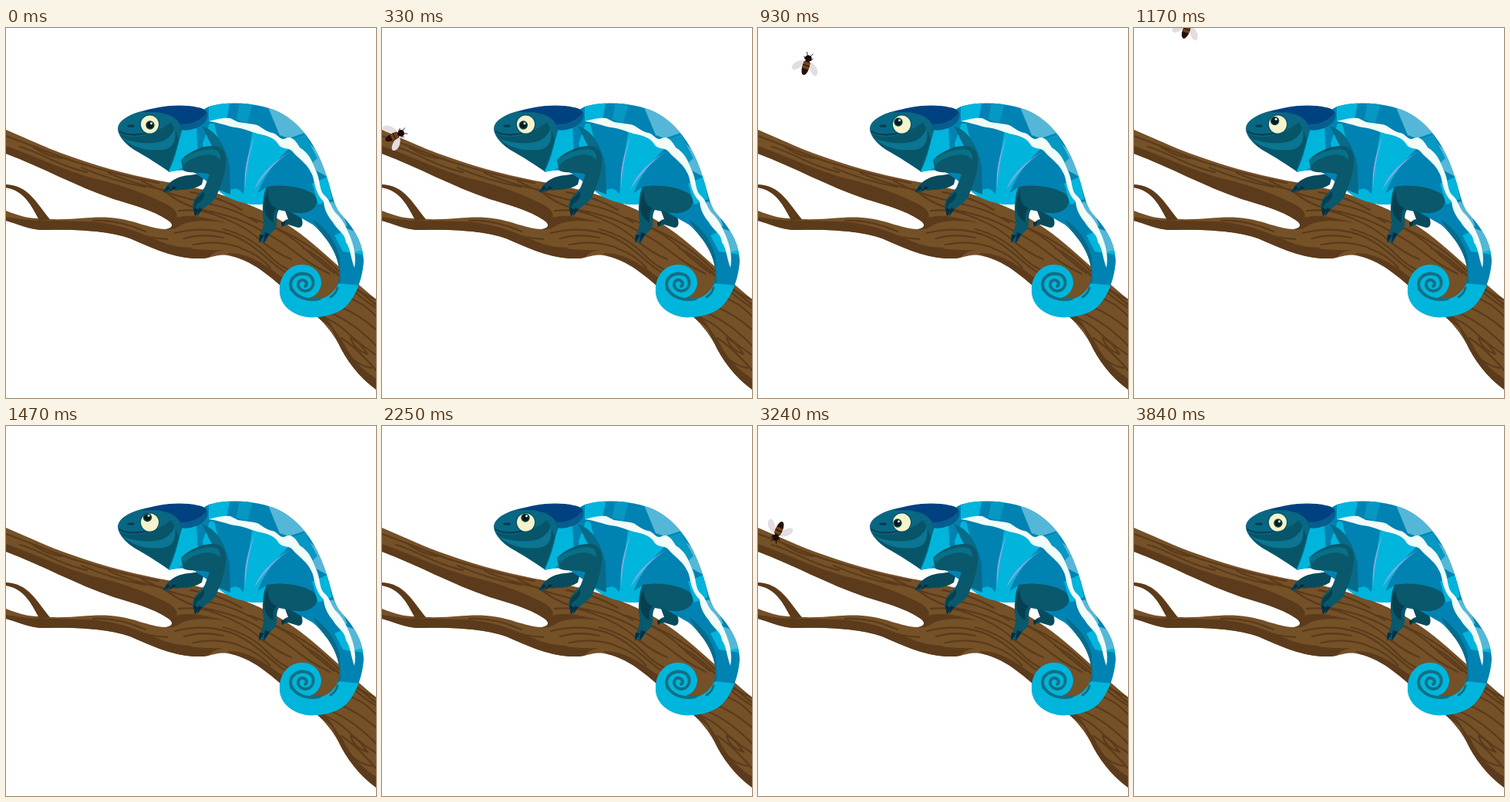
These frames come from a looping animation (480x480 px, 4230 ms). An HTML page:

```html
<!DOCTYPE html>
<html lang="en">
<head>
<meta charset="utf-8">
<title>Chameleon watching a fly</title>
<style>
html, body { margin: 0; width: 100%; height: 100%; overflow: hidden; background: #fff; }
svg { display: block; width: 100vw; height: 100vh; }
.line { fill: none; stroke-linecap: round; stroke-linejoin: round; }
</style>
</head>
<body>
<svg viewBox="0 0 480 480">
<defs>
  <path id="wood" d="M0 132C35 147 58 158 85 167C130 183 170 193 215 201C270 211 315 226 350 246C394 270 434 314 480 352V469C456 451 442 431 431 409C416 382 397 368 372 348C350 329 323 302 292 296C272 291 270 300 245 299C211 297 185 283 161 273C131 262 82 261 50 262C30 262 15 254 0 250V237C15 243 28 247 42 247C33 231 24 211 0 207V203C30 204 40 228 57 248C95 249 110 244 135 246C165 248 184 260 207 261C216 260 218 255 211 250C189 235 162 229 140 222C90 205 48 181 0 163Z"/>
  <path id="body" d="M211 187C214 165 220 147 226 130C238 116 252 108 263 102C290 94 328 97 354 109C386 125 404 158 413 184C423 211 424 229 434 241C451 259 463 278 464 302C463 324 454 349 440 362C426 373 409 376 391 375C367 371 354 356 355 338C356 319 369 307 384 307C399 307 409 318 409 331C408 344 398 351 386 351C402 357 424 350 431 331C438 305 421 275 398 255L345 225C333 230 320 230 306 226C295 224 279 216 272 207L245 188C234 183 222 184 211 187Z"/>
  <clipPath id="inWood"><use href="#wood"/></clipPath>
  <clipPath id="inBody"><use href="#body"/></clipPath>
  <clipPath id="inEye"><circle cx="186.500" cy="125" r="11.500"/></clipPath>
</defs>

<use href="#wood" fill="#755128"/>
<g clip-path="url(#inWood)">
  <g fill="#5b3b1b">
    <path d="M0 153C45 169 82 188 122 197C157 206 184 216 211 230C225 239 225 249 214 253L195 247L110 220L0 170Z"/>
    <path d="M0 245C33 252 69 249 103 251C147 252 179 268 208 280C230 286 258 289 282 288C256 294 270 302 246 302C190 297 165 272 115 264L40 266L0 254Z"/>
    <path d="M0 203C25 204 39 225 57 249L43 250C32 228 22 211 0 208Z"/>
    <path d="M286 292C317 291 339 310 365 328C403 350 419 382 437 407C449 431 464 445 482 456V472L447 444L422 389L380 357L330 315Z"/>
    <path d="M213 248C236 239 263 247 288 253C262 249 239 249 225 257C219 261 211 263 204 260Z"/>
  </g>
  <g class="line" stroke="#5b3b1b" stroke-width="2.300">
    <path d="M0 140C31 151 57 163 91 174C133 187 160 194 198 201"/>
    <path d="M18 154C48 163 71 180 105 187M35 154Q52 166 72 169M98 181Q139 199 181 206M133 188Q164 202 204 210"/>
    <path d="M176 198C205 215 237 222 268 229C291 234 306 241 326 252M205 211Q231 233 270 239M240 213Q277 219 306 236"/>
    <path d="M224 237C265 233 305 247 333 264C368 280 381 301 420 319M252 237Q304 250 333 278Q351 292 370 300"/>
    <path d="M219 266C252 258 285 261 310 277C335 291 352 316 382 327M231 273Q254 266 282 272M243 281Q276 274 304 285"/>
    <path d="M282 261Q317 270 339 293Q356 311 377 318M305 286Q327 293 343 311M317 246Q365 262 396 294L426 318"/>
    <path d="M352 260Q395 280 425 309Q449 334 480 359M385 285Q414 300 443 333Q460 351 480 363"/>
    <path d="M398 371Q425 377 446 398Q461 412 480 424M409 366Q443 374 480 412M432 361Q455 370 480 391M441 349Q464 356 480 374M448 336Q465 346 480 352"/>
    <path d="M435 402Q455 415 480 444M447 402Q451 417 469 423Q459 407 447 402M444 424Q459 439 474 441"/>
    <path d="M65 255C105 253 134 256 164 265M113 250Q145 248 181 264M151 264Q184 272 209 274M173 269Q204 286 239 286M10 247Q28 254 53 256"/>
  </g>
</g>

<!-- far limbs -->
<path fill="#084b5d" d="M204 213C208 202 220 192 238 191L258 188L254 203C243 211 229 209 220 211L216 209L207 214ZM362 237L366 248C360 249 357 254 358 258L366 255L379 259C385 259 386 253 383 245L377 236Z"/>

<use href="#body" fill="#0083b2"/>
<g clip-path="url(#inBody)">
  <g fill="#00b5dc">
    <path d="M229 130L247 128L249 163L218 190H205Z"/>
    <path d="M263 95L291 94L286 119L263 121ZM264 124L270 124L286 188L291 226L270 207L255 150Z"/>
    <path d="M320 131L345 141L357 153L369 154C351 172 329 195 322 230H307C309 197 315 162 320 131Z"/>
    <path d="M290 211Q300 204 307 215Q316 205 322 217L339 206V235H280Z"/>
    <path d="M397 202L417 193L423 222L405 229ZM426 269L444 261L465 278L464 294L437 290Z"/>
    <path d="M429 331L459 334L446 390H340V295H415V347Z"/>
  </g>
  <g fill="#55b7d7">
    <path d="M338 98L359 105Q382 121 388 136L367 143L355 139Z"/>
    <path d="M393 149L405 161L417 193L402 185L386 160ZM424 225L437 241L443 258L427 248L414 229Z"/>
    <path d="M442 260L456 265L466 287L451 291Z"/>
  </g>
  <path fill="#0698c2" d="M304 90L322 92L313 123L299 119ZM366 146L388 138L404 169L395 177Z"/>
  <path fill="#81a9df" d="M325 136Q313 165 310 209Q307 174 325 136ZM370 160Q343 177 322 210Q332 182 370 160Z"/>
  <path fill="#086b8b" d="M254 127Q281 136 290 178L291 216L269 207L272 163ZM398 248Q424 265 433 297L434 329L429 335L418 280Z"/>
  <path fill="#f1fbf7" d="M263 121C273 119 280 116 291 117L301 122L322 125C330 126 335 134 345 136C353 137 355 147 363 143C371 139 377 148 381 155C394 163 397 173 402 185C408 197 406 209 412 216C420 222 421 231 427 239C437 248 441 258 445 267C451 281 455 296 452 311C447 298 447 286 441 278C440 266 430 263 424 252C416 242 413 235 412 225C399 212 401 196 396 188C391 177 382 171 374 163C367 153 361 159 354 152C348 141 336 139 326 137C316 134 308 130 297 129C286 127 278 123 263 121Z"/>
</g>
<path class="line" stroke="#126f83" stroke-width="4" d="M407 351C391 355 375 349 370 337C366 325 378 317 388 319C400 320 402 335 393 340C384 344 376 336 380 329C385 323 394 331 388 335"/>
<path class="line" stroke="#126f83" stroke-width="3" d="M370 340C367 326 373 321 381 319M430 337Q428 345 421 349"/>

<!-- head -->
<path fill="#096783" d="M145 130C146 121 156 115 166 111C179 106 205 101 225 107L231 126C224 141 223 163 211 186C196 176 184 168 170 160C157 153 145 141 145 130Z"/>
<path fill="#075569" d="M148 137Q162 144 181 139Q203 132 214 122Q220 132 224 143C220 163 213 174 211 186C196 175 184 168 170 160Q154 151 148 137Z"/>
<path fill="#0b7592" d="M151 143Q169 151 193 149C207 148 216 139 219 130C222 151 213 160 195 158Q171 160 151 143Z"/>
<path fill="#00427f" d="M175 109C198 101 226 98 249 103C256 104 260 107 261 111C261 123 243 131 229 132C226 121 217 113 204 111C195 108 187 110 175 109Z"/>
<path fill="#075e8e" d="M261 109Q264 123 246 130Q236 134 227 132L225 125Q248 126 261 109Z"/>
<path class="line" stroke="#063d50" stroke-width="1.800" d="M147 134Q157 140 172 138Q186 137 196 133"/>
<ellipse cx="162" cy="127" rx="5" ry="1.800" fill="#063f50"/>
<circle cx="186.500" cy="125" r="13" fill="#075569"/>
<circle cx="186.500" cy="125" r="11.500" fill="#f4f3cc"/>
<g clip-path="url(#inEye)">
  <g id="pupil">
    <circle r="5.700" fill="#0b4545"/>
    <circle r="4.200" fill="#041b20"/>
    <circle cx="1.500" cy="-2.300" r="1.500" fill="#f4f3cc"/>
  </g>
</g>

<!-- near limbs -->
<path fill="#09586c" d="M227 171C238 160 254 153 268 153C283 152 287 165 285 178C283 194 277 209 273 218C269 227 259 231 253 237L248 244L243 238L242 230C243 220 254 213 258 206L264 190C254 186 238 189 230 185ZM338 206C360 202 382 206 397 214C406 221 405 232 395 237C381 244 367 238 354 236C349 243 353 254 350 260L342 268L336 278H328C328 269 336 258 334 249C332 235 333 216 338 206Z"/>
<path fill="#087087" d="M227 171Q246 158 267 157Q279 158 278 171Q269 161 251 166Q236 170 231 178Z"/>
<path fill="#06404f" d="M340 209Q338 228 351 234Q345 238 347 252Q333 245 335 224ZM257 212Q259 222 248 228L243 238L245 223Z"/>
<path fill="#052e40" d="M204 213L210 205L213 208ZM211 213L217 205L222 207ZM243 232L245 245L250 236ZM250 233L248 244L255 235ZM329 268L328 279L335 269ZM336 265L334 279L342 267ZM357 252L358 258L363 252Z"/>

<g id="fly">
  <g fill="#e5dce0">
    <path id="wing" d="M2 -4C9 -5 19 3 17 10C14 15 5 7 2 -4Z"/>
    <use href="#wing" transform="scale(-1 1)"/>
  </g>
  <path class="line" stroke="#1b0b09" stroke-width=".8" d="M-2 -11L-4 -15M2 -11L4 -15M-4 -6L-6 -9M4 -6L6 -9"/>
  <ellipse cy="4" rx="4.600" ry="10.500" fill="#26100d"/>
  <path fill="#70451f" d="M-4.500 -3H4.500L4.200 6H-4.200Z"/>
  <path fill="#351a10" d="M-4.600 1H4.600V2.500H-4.600Z"/>
  <ellipse cy="-8" rx="4.500" ry="4" fill="#1b0b09"/>
</g>
</svg>

<script>
const LOOP = 4230;
const fly = document.getElementById("fly");
const pupil = document.getElementById("pupil");

// Keys: time, x, y, heading
const rise = [
  [150, -20, 142, 78], [380, 28, 139, 62], [570, 64, 120, 17],
  [750, 65, 84, 15], [930, 63, 47, 17], [1110, 66, 15, 20], [1250, 73, -20, 22]
];
const dive = [
  [2640, 190, -18, -128], [2780, 153, 22, -128], [2910, 112, 55, -120],
  [3040, 66, 80, -120], [3150, 35, 107, -137], [3280, 22, 151, -165]
];
// Keys: time, x, y
const gaze = [
  [0, 187, 126], [150, 187, 126], [450, 181, 126], [570, 181, 126],
  [930, 182, 122], [1470, 183.5, 118.5], [1700, 183.5, 118.5],
  [2250, 186, 119], [2610, 186, 119], [2910, 184, 122],
  [3180, 181, 126], [3690, 181, 126], [3840, 187, 126], [LOOP, 187, 126]
];

function at(keys, t) {
  const i = keys.findIndex(k => k[0] > t);
  if (i < 1) return null;
  const a = keys[i - 1], b = keys[i], u = (t - a[0]) / (b[0] - a[0]);
  return a.slice(1).map((v, j) => v + (b[j + 1] - v) * u);
}

function draw(now) {
  const t = Math.floor(now % LOOP / 30) * 30;
  const [px, py] = at(gaze, t);
  pupil.setAttribute("transform", `translate(${px} ${py})`);
  const pose = at(rise, t) || at(dive, t);
  fly.style.display = pose ? "" : "none";
  if (pose) fly.setAttribute("transform", `translate(${pose[0]} ${pose[1]}) rotate(${pose[2]})`);
  requestAnimationFrame(draw);
}
draw(0);
</script>
</body>
</html>
```
